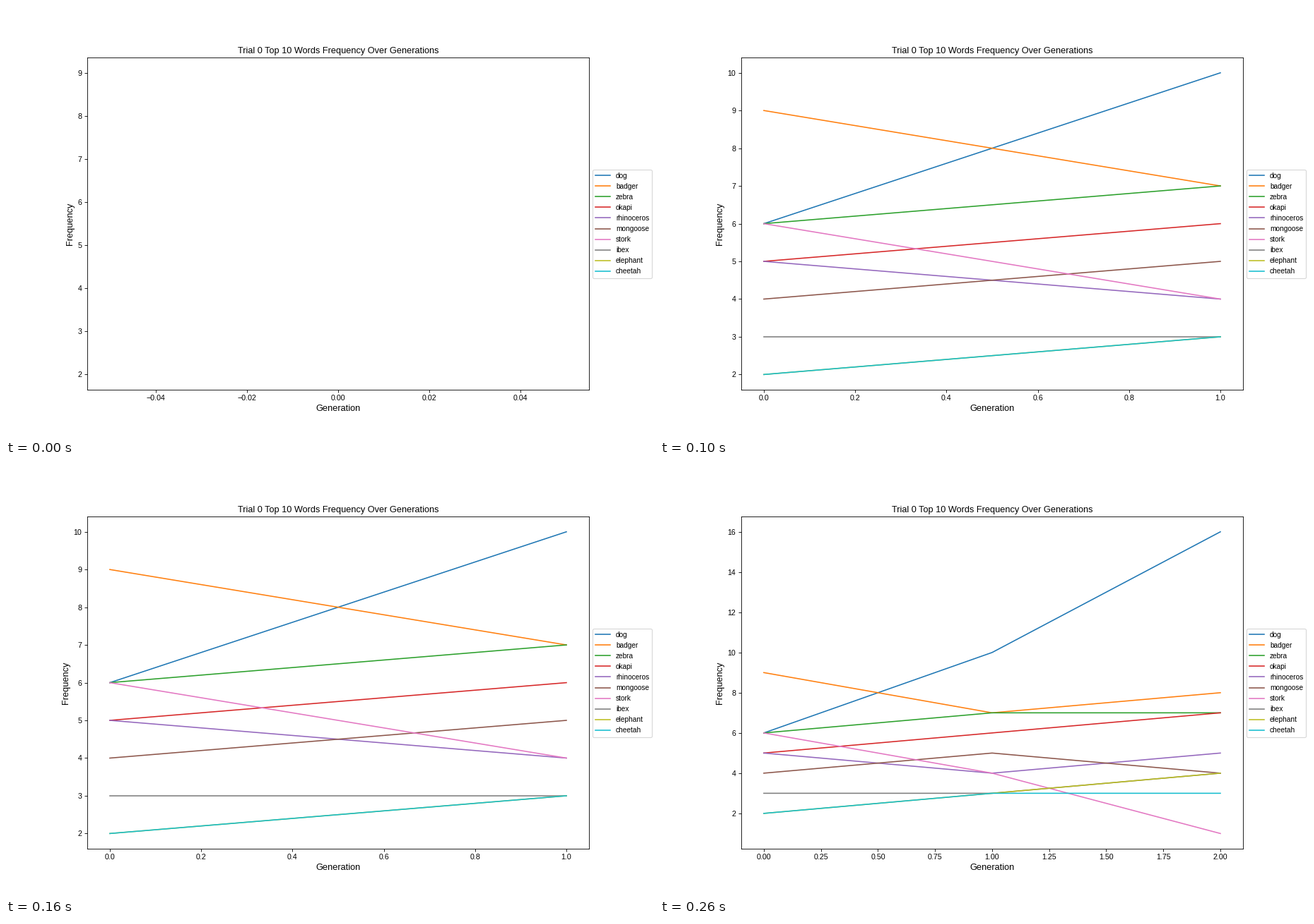
A matplotlib script that plays this animation: 917x611 px, repeating every 300 ms.

```python
import matplotlib.pyplot as plt
from matplotlib.animation import FuncAnimation

DPI = 76.4
WIDTH, HEIGHT = 917, 611

plt.rcParams.update({
    "font.family": "Liberation Sans",
    "font.size": 10,
    "axes.titlesize": 12,
    "axes.labelsize": 12,
    "legend.fontsize": 9.6,
})

# Word counts per generation
COUNTS = {
    "dog": (6, 10, 16),
    "badger": (9, 7, 8),
    "zebra": (6, 7, 7),
    "okapi": (5, 6, 7),
    "rhinoceros": (5, 4, 5),
    "mongoose": (4, 5, 4),
    "stork": (6, 4, 1),
    "ibex": (3, 3, 4),
    "elephant": (2, 3, 4),
    "cheetah": (2, 3, 3),
}

# The small surplus keeps the pixel size from rounding down
fig, ax = plt.subplots(
    figsize=((WIDTH + 0.01) / DPI, (HEIGHT + 0.01) / DPI), dpi=DPI)


def update(generation):
    ax.clear()
    xs = range(generation + 1)
    for word, counts in COUNTS.items():
        ax.plot(xs, counts[:generation + 1], label=word)
    ax.set_title("Trial 0 Top 10 Words Frequency Over Generations")
    ax.set_xlabel("Generation")
    ax.set_ylabel("Frequency")
    ax.legend(loc="center left", bbox_to_anchor=(1, 0.5))


anim = FuncAnimation(fig, update, frames=3, interval=100,
                     init_func=lambda: None, repeat=True, repeat_delay=0)
plt.show()
```
